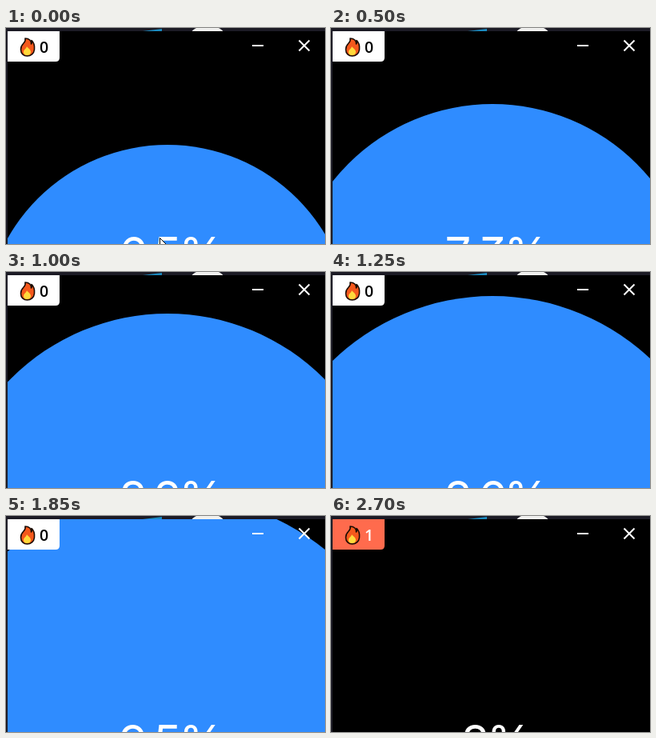
Recreate the animation shown at these times as an HTML page. Size 399 by 270 pixels, loop 2750 ms.

```html
<!DOCTYPE html>
<html lang="en">
<head>
<meta charset="utf-8">
<title>Progress circle</title>
<style>
  html, body { margin: 0; width: 100%; height: 100%; overflow: hidden; background: #1c1b25; }
  svg { display: block; width: 399px; height: 270px; }
  #percent { font: 400 58px Inter, sans-serif; font-feature-settings: "cv09"; fill: #fff; text-anchor: middle; }
  #count { font: 600 19.5px "Open Sans", "Noto Sans", sans-serif; text-anchor: middle; }
</style>
</head>
<body>
<svg viewBox="0 0 399 270">
  <clipPath id="window"><rect x="2" y="4" width="397" height="266"/></clipPath>
  <rect width="399" height="270" fill="#1c1b25"/>
  <path d="M171 4L195 1V4Z" fill="#1b8abf"/>
  <ellipse cx="252" cy="10" rx="22" ry="13" fill="#f0f0ee"/>
  <g clip-path="url(#window)">
    <rect x="2" y="4" width="397" height="266" fill="#000"/>
    <circle id="disc" cx="202"/>
    <text id="percent" y="303"></text>
  </g>
  <path id="badge" d="M2 4H67V37Q67 42 62 42H2Z"/>
  <g stroke="#1b0c04" stroke-width="1.6" stroke-linejoin="round">
    <path d="M24 13C29 13 32 16 31.500 20C32.500 19 32.500 17 32 15.500C35 18 36 22 35.500 27C35 32 31 35 26.500 35C22 35 18.500 32 18.500 27C18.500 23 20 21 22 19C24 17 24.500 15 24 13Z" fill="#f4581c"/>
    <path d="M26 23C27 25 31.500 27 31 30.500C30.500 33 29 34 26.500 34C24 34 22 33 22 30C22 27 25.500 26 26 23Z" fill="#ffd93b" stroke="none"/>
  </g>
  <text id="count" x="47.500" y="31"></text>
  <path d="M308 22H322M366.500 15.500L379.500 28.500M379.500 15.500L366.500 28.500" stroke="#fff" stroke-width="2" fill="none"/>
  <path id="pointer" d="M192.500 262.500V276L196 273L204 274Z" fill="#fff" stroke="#000"/>
</svg>
<script>
const LOOP = 2750, STEP = 50, DONE = 2185, RESET = 2200, FADE = 300;
const BOTTOM = 605, CELL = 43, CENTER = 202;

// [time, value]
const percentKeys = [[0, 65.1], [50, 66.2], [500, 73.8], [1000, 82.1], [1500, 90.3], [1850, 95.9], [2100, 100], [RESET, 100]];
const topKeys = [[0, 146], [50, 135], [500, 95], [1000, 52], [1500, 8], [1850, -27], [2100, -50], [DONE, -50]];

const $ = id => document.getElementById(id);
const mix = (a, b, k) => a + (b - a) * k;
const mixColor = (a, b, k) => `rgb(${a.map((v, i) => Math.round(mix(v, b[i], k)))})`;

function sample(keys, t) {
  const i = keys.findIndex(key => key[0] > t);
  if (i < 0) return keys[keys.length - 1][1];
  const [t0, v0] = keys[i - 1], [t1, v1] = keys[i];
  return mix(v0, v1, (t - t0) / (t1 - t0));
}

// cubic-bezier(.25, .1, .25, 1)
function ease(x) {
  if (x <= 0) return 0;
  if (x >= 1) return 1;
  const curve = (a, b, u) => 3 * a * u * (1 - u) ** 2 + 3 * b * u * u * (1 - u) + u ** 3;
  let lo = 0, hi = 1;
  for (let i = 0; i < 20; i++) {
    const mid = (lo + hi) / 2;
    if (curve(.25, .25, mid) < x) lo = mid; else hi = mid;
  }
  return curve(.1, 1, lo);
}

function draw(t) {
  const k = ease((t - DONE) / FADE);
  const r = (BOTTOM - mix(sample(topKeys, t), 483, k)) / 2;
  $("disc").setAttribute("r", r);
  $("disc").setAttribute("cy", BOTTOM - r);
  $("disc").setAttribute("fill", mixColor([47, 140, 255], [29, 164, 125], k));

  const percent = t < RESET ? sample(percentKeys, t) : (t - RESET) / 60;
  const label = Math.floor(percent) + "%";
  const xs = [...label].map((c, i) => CENTER + (i - (label.length - 1) / 2) * CELL);
  $("percent").setAttribute("x", xs.join(" "));
  $("percent").textContent = label;

  $("badge").setAttribute("fill", mixColor([255, 255, 255], [255, 107, 77], k));
  $("count").setAttribute("fill", mixColor([0, 0, 0], [255, 255, 255], k));
  $("count").textContent = t < DONE ? 0 : 1;
  $("pointer").style.display = t < STEP ? "" : "none";
}

const start = performance.now();
function tick() {
  const t = (performance.now() - start) % LOOP;
  draw(t - t % STEP);
  requestAnimationFrame(tick);
}
tick();
</script>
</body>
</html>
```
